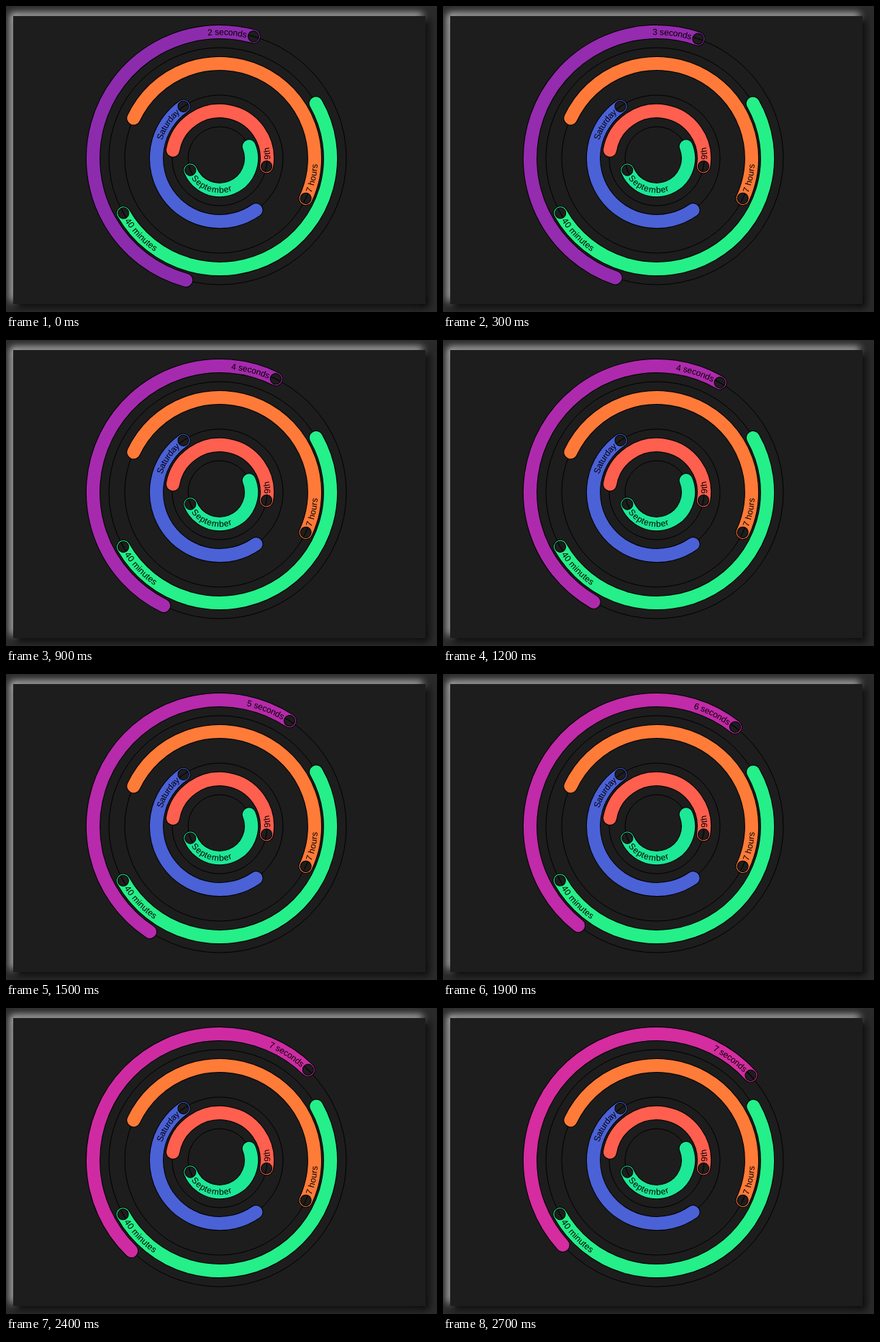
An HTML page for the animation above (2.8 s loop, 599 by 426 pixels).

```html
<!DOCTYPE html>
<html lang="en">
<head>
<meta charset="utf-8">
<title>Polar clock</title>
<style>
  html, body { margin: 0; width: 100%; height: 100%; overflow: hidden; background: #2a2a2a; }
  #panel {
    position: absolute; left: 10px; top: 14px; width: 573px; height: 401px;
    background: #1d1d1d; box-shadow: 4px 4px 10px #000, -4px -4px 10px #ccc;
  }
  svg { position: absolute; left: 0; top: 0; }
  circle, path { fill: none; stroke: #000; }
  text { font: 12px "Liberation Sans", Arial, sans-serif; }
</style>
</head>
<body>
<div id="panel"></div>
<svg width="599" height="426"><g id="clock" transform="translate(297 212)"></g></svg>
<script>
const LOOP = 2800, STEP = 100, START = 2.575, SPEED = 2;
const ARM = 9.57, DOT = ARM - 2;

const fields = [
  { radius: 44, label: () => 'September', value: d => (251 + d) / 365 },
  { radius: 66, label: () => '9th', value: d => (8 + d) / 30 },
  { radius: 88, label: () => 'Saturday', value: d => (6 + d) / 7 },
  { radius: 132, label: () => '7 hours', value: d => d },
  { radius: 154, label: () => '40 minutes', value: (d, s) => (40 + s / 60) / 60 },
  { radius: 176, label: s => Math.floor(s) + ' seconds', value: (d, s) => s / 60 },
];

function add(parent, tag, attrs) {
  const el = document.createElementNS('http://www.w3.org/2000/svg', tag);
  for (const key in attrs) el.setAttribute(key, attrs[key]);
  return parent.appendChild(el);
}

// Cubehelix rainbow, slightly shifted in tone
function rainbow(t) {
  const d = Math.abs(t - 0.5), l = 0.8 - 0.9 * d;
  const a = (1.5 - 1.5 * d) * l * (1 - l);
  const h = (360 * t + 20) * Math.PI / 180;
  const mix = (c, s) => 255 * Math.min(1, l + a * (c * Math.cos(h) + s * Math.sin(h)));
  const r = mix(-0.14861, 1.78277), g = mix(-0.29227, -0.90649), b = mix(1.97294, 0);
  return `rgb(${r > 250 ? r : r - 3}, ${1.14 * g - 27}, ${b - 5})`;
}

const clock = document.getElementById('clock');
for (const f of fields) add(clock, 'circle', { r: f.radius });

fields.forEach((f, i) => {
  const r = f.radius, gap = ARM / r;
  const textStart = `${-r * Math.sin(gap)} ${-r * Math.cos(gap)}`;
  const flipped = f.value(0.3195, START) > 0.25 && f.value(0.3195, START) < 0.75;
  const half = `M0 ${-r}A${r} ${r} 0 0 0 0 ${r}`;

  f.group = add(clock, 'g', {});
  add(f.group, 'path', { d: half, 'stroke-width': 2 * ARM + 1, 'stroke-linecap': 'round' });
  f.body = add(f.group, 'path', { d: half, 'stroke-width': 2 * ARM - 1, 'stroke-linecap': 'round' });
  add(f.group, 'circle', { cy: -r, r: DOT, style: 'fill: #1d1d1d' });
  const x = DOT * Math.cos(DOT / r / 2), y = -r + DOT * Math.sin(DOT / r / 2);
  add(f.group, 'path', { d: `M${-x} ${y}A${r} ${r} 0 0 1 ${x} ${y}` });
  add(f.group, 'path', {
    id: 'arc' + i, style: 'stroke: none',
    d: flipped ? `M${textStart}A${r} ${r} 0 0 0 0 ${r}` : `M0 ${r}A${r} ${r} 0 0 1 ${textStart}`,
  });
  const text = add(f.group, 'text', { dy: '.35em', 'text-anchor': flipped ? 'start' : 'end' });
  f.text = add(text, 'textPath', { href: '#arc' + i, startOffset: flipped ? '0%' : '100%' });
});

function draw(now) {
  const seconds = START + SPEED * Math.floor((now % LOOP) / STEP) * STEP / 1000;
  const day = (7 + (40 + seconds / 60) / 60) / 24;
  for (const f of fields) {
    const value = f.value(day, seconds), label = f.label(seconds);
    f.group.setAttribute('transform', `rotate(${360 * value})`);
    f.body.style.stroke = rainbow(value);
    if (f.text.textContent !== label) f.text.textContent = label;
  }
  requestAnimationFrame(draw);
}
draw(0);
</script>
</body>
</html>
```
